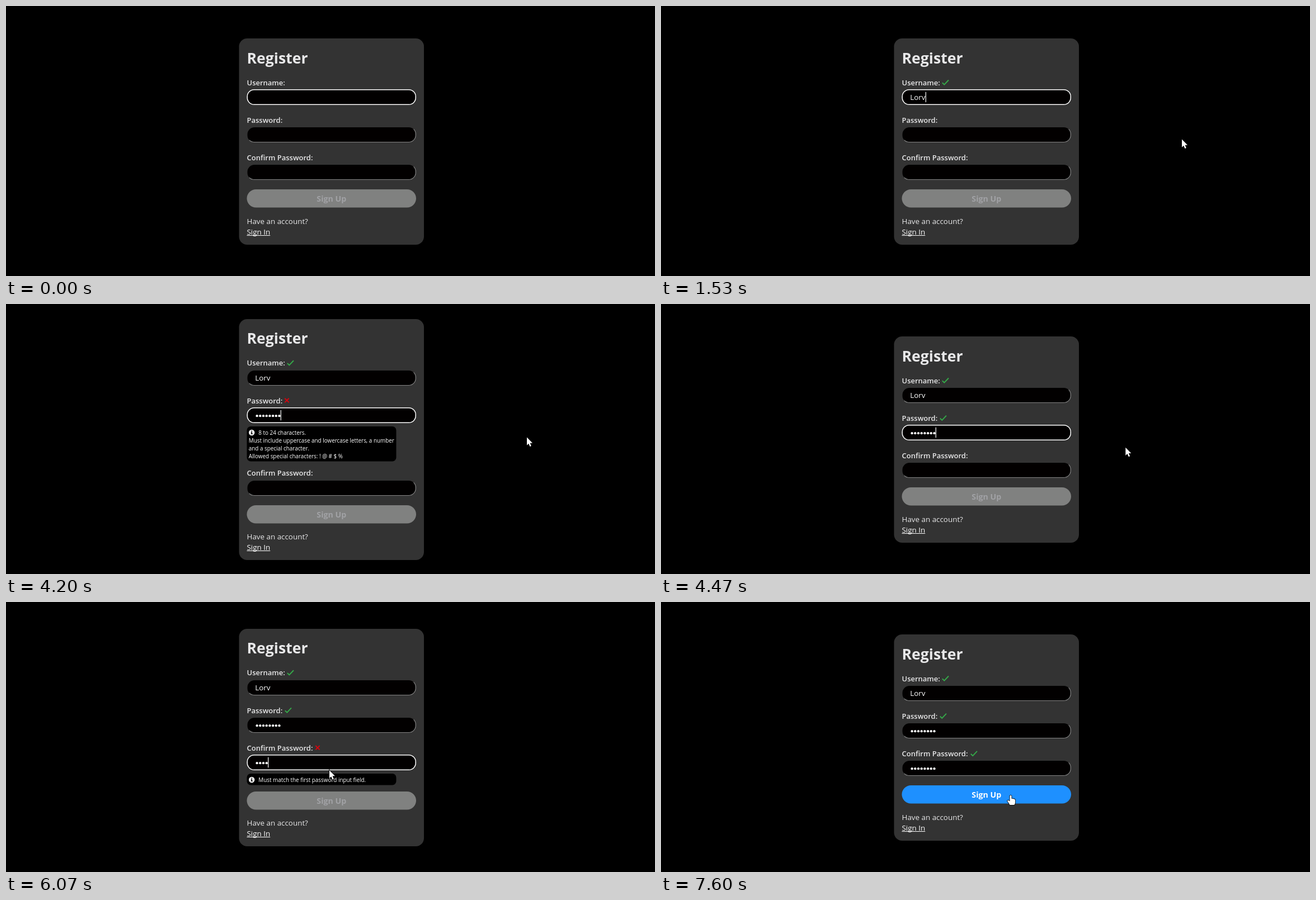
These frames come from a looping animation (1160x483 px, 8 s). An HTML page with a canvas:

```html
<!DOCTYPE html>
<html lang="en">
<head>
<meta charset="utf-8">
<title>Register form</title>
<style>
  html, body { margin: 0; width: 100%; height: 100%; overflow: hidden; background: #000; }
  canvas { display: block; }
</style>
</head>
<body>
<canvas id="stage" width="1160" height="483"></canvas>
<script>
const ctx = document.getElementById('stage').getContext('2d');
const LOOP = 8000, BLINK = 530, VALIDATE_DELAY = 60;
const LEFT = 430.5, WIDTH = 302.5, FIELD_H = 28;
const FACE = '"Open Sans", "Noto Sans", sans-serif';
const INK = '#e8e8e9';

const USERNAME = 'Lorv';
const FOCUS_TIMES = [270, 2330, 4930, 7530];
const FIELDS = [
  { label: 'Username:', iconX: 502, keys: [1000, 1200, 1400, 1470], noteH: 62.5, note: [
    'Username must be between 4 and 24 characters', 'long.',
    'Must begin with a letter.', 'Letters, numbers, underscores and hyphens allowed.'] },
  { label: 'Password:', iconX: 498, keys: [3000, 3130, 3270, 3330, 3670, 3930, 4070, 4200], noteH: 62.5, note: [
    '8 to 24 characters.', 'Must include uppercase and lowercase letters, a number',
    'and a special character.', 'Allowed special characters: ! @ # $ %'] },
  { label: 'Confirm Password:', iconX: 553, keys: [5670, 5730, 5930, 6070, 6330, 6670, 6670, 6930], noteH: 20.5, note: [
    'Must match the first password input field.'] }
];
const EVENTS = FOCUS_TIMES.concat(...FIELDS.map(f => f.keys));

const countPassed = (times, t) => times.filter(k => t >= k).length;
const isValid = (field, t) => t >= field.keys[field.keys.length - 1] + VALIDATE_DELAY;
const smooth = (t, a, b) => {
  const p = Math.min(1, Math.max(0, (t - a) / (b - a)));
  return p * p * (3 - 2 * p);
};

function text(str, x, y, size, weight = 400, color = INK) {
  ctx.font = `${weight} ${size}px ${FACE}`;
  ctx.fillStyle = color;
  ctx.fillText(str, x, Math.round(y));
  return ctx.measureText(str).width;
}

function box(x, y, w, h, r, fill) {
  ctx.beginPath();
  ctx.roundRect(x, y, w, h, r);
  ctx.fillStyle = fill;
  ctx.fill();
}

function line(points, color, width) {
  ctx.beginPath();
  points.forEach(([x, y]) => ctx.lineTo(x, y));
  ctx.strokeStyle = color;
  ctx.lineWidth = width;
  ctx.stroke();
}

function disc(x, y, r, fill) {
  ctx.beginPath();
  ctx.arc(x, y, r, 0, Math.PI * 2);
  ctx.fillStyle = fill;
  ctx.fill();
}

function drawStatus(x, y, valid) {
  if (valid) {
    line([[x + 0.8, y + 0.8], [x + 4.3, y + 4.2], [x + 12, y - 4]], '#35a949', 1.9);
  } else {
    const c = x + 4;
    line([[c - 3.7, y - 3.7], [c + 3.7, y + 3.7]], '#d2060f', 2);
    line([[c - 3.7, y + 3.7], [c + 3.7, y - 3.7]], '#d2060f', 2);
  }
}

function drawInput(y, focused) {
  if (focused) {
    box(LEFT, y, WIDTH, FIELD_H, 13, '#fff');
    box(LEFT + 1.5, y + 1.4, WIDTH - 3, FIELD_H - 2.8, 11.5, '#020000');
    return;
  }
  box(LEFT + 1, y + 1, WIDTH - 1.5, FIELD_H - 1, 12.5, '#020000');
  // lit half of an inset border: right and bottom edges
  const r = 12.5, right = LEFT + WIDTH - 0.7, bottom = y + FIELD_H - 0.5;
  ctx.beginPath();
  ctx.arc(right - r, y + 0.7 + r, r, -Math.PI / 4, 0);
  ctx.arc(right - r, bottom - r, r, 0, Math.PI / 2);
  ctx.arc(LEFT + 0.7 + r, bottom - r, r, Math.PI / 2, Math.PI * 0.75);
  ctx.strokeStyle = '#858585';
  ctx.lineWidth = 1.2;
  ctx.stroke();
}

function drawNote(field, y) {
  box(LEFT, y, 267, field.noteH, 7, '#000');
  disc(439.2, y + 11, 5.2, '#fff');
  ctx.fillStyle = '#000';
  ctx.fillRect(438.4, y + 7.6, 1.7, 1.7);
  ctx.fillRect(438.4, y + 10.1, 1.7, 3.6);
  ctx.fillRect(437.6, y + 10.1, 1.5, 1.1);
  ctx.fillRect(437.4, y + 12.9, 3.7, 1.1);
  field.note.forEach((str, i) => text(str, i ? 433.8 : 451.3, y + 15 + i * 14, 9.88, 400, '#fff'));
}

function drawField(index, top, t, focused) {
  const field = FIELDS[index];
  const count = countPassed(field.keys, t);
  const y = Math.round(top);
  text(field.label, LEFT, top - 7.4, 13, 600);
  if (count) drawStatus(field.iconX, top - 12.5, isValid(field, t));
  drawInput(y, focused);

  let caretX = 446;
  if (index === 0) {
    caretX += text(USERNAME.slice(0, count), 445.3, y + 19, 13.4, 400, '#fff');
  } else {
    for (let i = 0; i < count; i++) disc(448.6 + i * 5.7, y + 15.2, 2.15, '#fff');
    caretX += count * 5.65;
  }
  const last = Math.max(...EVENTS.filter(k => k <= t));
  if (focused && t >= last && (t - last) % (2 * BLINK) < BLINK) {
    ctx.fillStyle = '#fff';
    ctx.fillRect(caretX - 0.5, y + 4.7, 1.2, 18.5);
  }
}

function outlined(path) {
  ctx.lineWidth = 1.6;
  ctx.strokeStyle = '#000';
  ctx.stroke(path);
  ctx.fillStyle = '#fff';
  ctx.fill(path);
}

const ARROW = new Path2D('M0 0V14.2L3.2 11.2L5.5 16.4L7.8 15.4L5.6 10.3H10Z');
const HAND = new Path2D('M-1.5 1Q0 -1.4 1.5 1V6Q3 4.8 4 6.3Q5.6 5.4 6.3 7Q8.2 6.4 8.2 8.6V12' +
  'Q8 15 6.4 17H-1.6Q-2.6 14.2 -5.6 10.8Q-6.4 8.6 -4 8.8L-1.5 10.6Z');

function drawPointer(t, fieldY, buttonY, enabled) {
  if (t < 1000) return;
  const inward = smooth(t, 4330, 4730), down = smooth(t, 7070, 7530);
  const x = 931 - 353 * inward + 47 * down;
  const y = 238.5 + 64 * inward - (t >= 5470 ? 1.5 : 0) + 45 * down;
  const over = (top, h) => x > LEFT && x < LEFT + WIDTH && y > top && y < top + h;
  ctx.save();
  ctx.translate(x, y);
  if (over(fieldY, FIELD_H - 1)) {
    line([[0, -7], [0, 7]], '#fff', 1);
    line([[-2.5, -7], [2.5, -7]], '#fff', 1);
    line([[-2.5, 7], [2.5, 7]], '#fff', 1);
  } else {
    outlined(enabled && over(buttonY, 33) ? HAND : ARROW);
  }
  ctx.restore();
}

function draw(t) {
  const focus = Math.max(0, countPassed(FOCUS_TIMES, t) - 1);
  const active = FIELDS[focus];
  const showNote = active && !isValid(active, t) && (focus > 0 || t >= active.keys[0]);
  const extra = showNote ? active.noteH : 0;
  const half = (369 + extra) / 2;
  const top = 242.5 - half, cardTop = Math.round(top);
  const fieldY = i => top + 91 + 67.2 * i + (i > focus ? extra : 0);

  ctx.fillStyle = '#000';
  ctx.fillRect(0, 0, 1160, 483);
  box(416.5, cardTop, 330.5, Math.round(242.5 + half) - cardTop, 14.5, '#333');
  text('Register', LEFT, top + 44.6, 26.6, 700);

  FIELDS.forEach((_, i) => drawField(i, fieldY(i), t, i === focus));
  if (showNote) drawNote(active, Math.round(fieldY(focus)) + 34);

  const base = top + extra;
  const buttonY = Math.round(base + 270.3);
  const enabled = isValid(FIELDS[2], t);
  box(LEFT, buttonY, WIDTH, 32.5, 16.25, enabled ? '#1e90ff' : '#808180');
  ctx.textAlign = 'center';
  text('Sign Up', 581.8, buttonY + 22, 14.2, 700, enabled ? '#fff' : '#a1a2a5');
  ctx.textAlign = 'left';

  text('Have an account?', LEFT, base + 332, 13.4);
  const linkY = Math.round(base + 351);
  const linkW = text('Sign In', LEFT, linkY, 13.4, 400, '#fff');
  ctx.fillRect(LEFT, linkY + 1, linkW, 1);

  drawPointer(t, fieldY(2), buttonY, enabled);
}

const start = performance.now();
function frame() {
  draw((performance.now() - start) % LOOP);
  requestAnimationFrame(frame);
}
frame();
</script>
</body>
</html>
```
